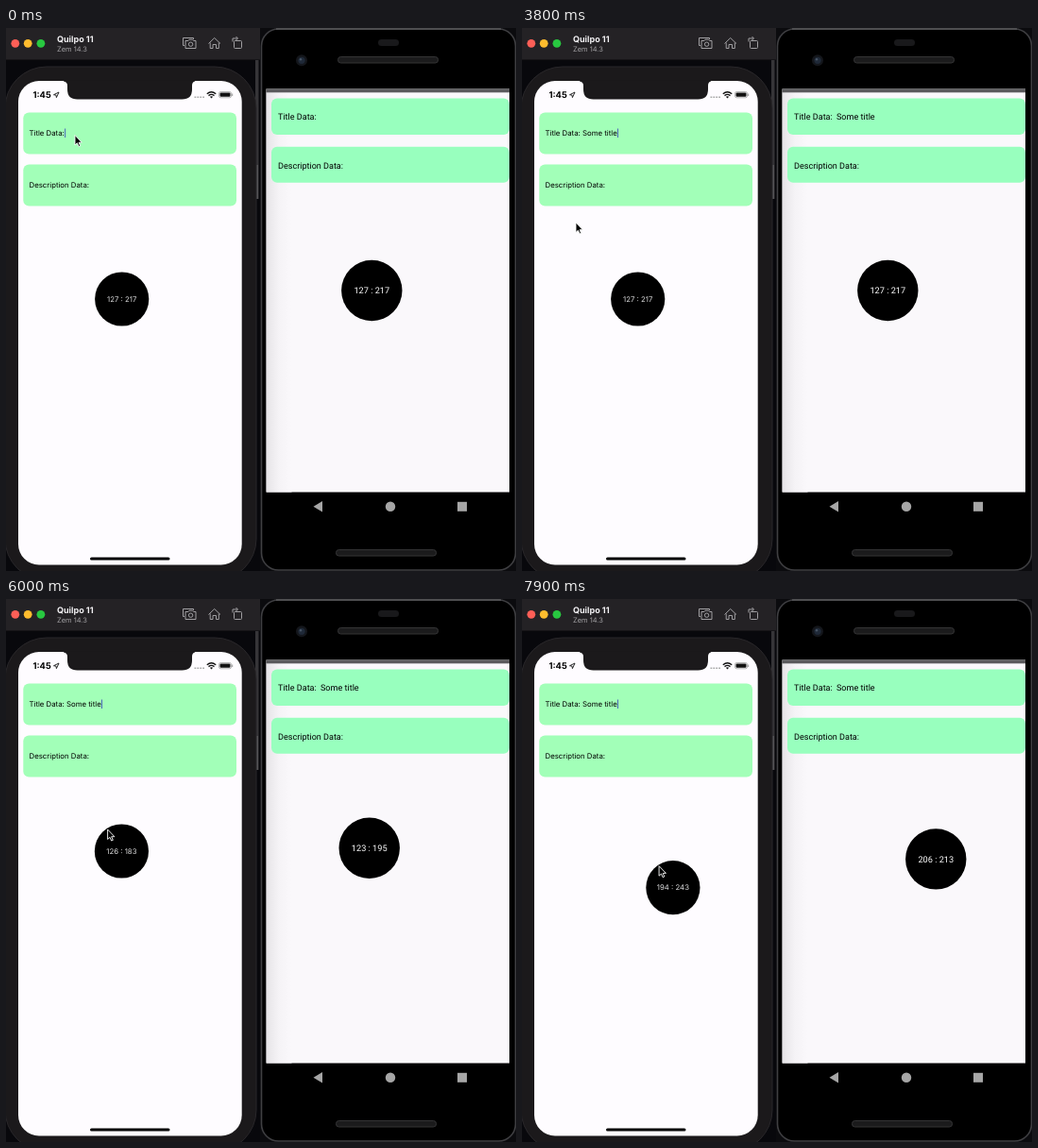
These frames come from a looping animation (540 px wide and 575 px high, 8000 ms). An HTML page:

```html
<!DOCTYPE html>
<html lang="en">
<head>
<meta charset="utf-8">
<title>Two phones in sync</title>
<style>
  html, body { margin: 0; width: 100%; height: 100%; overflow: hidden; background: #08080c; }
  svg { display: block; width: 540px; height: 575px; }
  text { white-space: pre; text-rendering: geometricPrecision; }
  .ios { font-family: Inter, "Liberation Sans", sans-serif; font-size: 7.8px; }
  .droid { font-family: Roboto, "Liberation Sans", sans-serif; font-size: 9.05px; }
  .mid { text-anchor: middle; }
  .tool { fill: none; stroke: #a09fa2; stroke-width: 1; stroke-linejoin: round; }
</style>
</head>
<body>
<svg viewBox="0 0 540 575">
  <defs>
    <linearGradient id="shade">
      <stop offset="0" stop-color="#e6e4e7"/>
      <stop offset=".5" stop-color="#f5f3f6"/>
      <stop offset="1" stop-color="#faf8fb"/>
    </linearGradient>
    <clipPath id="glass"><rect x="275.5" y="64.5" width="257.5" height="427"/></clipPath>
  </defs>

  <!-- left phone -->
  <rect y="33" width="271" height="542" fill="#08080c"/>
  <rect x="264" y="34" width="3.5" height="147" fill="#363538"/>
  <rect x="264.5" y="145" width="2.5" height="36" fill="#555457"/>
  <rect x="-1" y="41" width="266" height="544" rx="44" fill="#1b191b" stroke="#29272a"/>
  <rect x="13" y="56" width="236.7" height="512.5" rx="22" fill="#fefcff"/>
  <path d="M61 55.5H200V56.5Q197 57 197 61V65Q197 75.5 186.5 75.5H75.5Q65 75.5 65 65V61Q65 57 61 56.5Z" fill="#1b191b"/>
  <g class="ios">
    <text x="28.5" y="74" font-weight="700" style="font-size:9.3px">1:45</text>
    <path d="M50.5 70.7L56 68L53.4 73.6L53 71.1Z" fill="none" stroke="#111" stroke-width=".9"/>
    <path d="M199.500 73.200H210" stroke="#aaa" stroke-width="1.5" stroke-dasharray="1.8 1.1"/>
    <path d="M212.800 69.700Q217.500 65.800 222.200 69.700M214.500 71.600Q217.500 69.200 220.500 71.600" fill="none" stroke="#111" stroke-width="1.4"/>
    <path d="M215.900 72.800Q217.500 71.600 219.100 72.800L217.500 74.500Z" fill="#111"/>
    <rect x="225.5" y="67.5" width="13" height="6.3" rx="1.8" fill="none" stroke="#999" stroke-width=".7"/>
    <rect x="226.5" y="68.5" width="11" height="4.3" rx="1" fill="#111"/>
    <path d="M239.700 69.500V72" stroke="#999"/>
    <g fill="#a2ffb8">
      <rect x="18.3" y="89.5" width="225.700" height="44" rx="6"/>
      <rect x="18.3" y="144.5" width="225.700" height="44" rx="6"/>
    </g>
    <text id="leftTitle" x="24.5" y="114.3">Title Data:</text>
    <rect id="caret" y="106.5" width="1" height="9.5" fill="#4a68b8"/>
    <text x="24.5" y="169.3">Description Data:</text>
    <g id="leftBall">
      <circle r="28.6"/>
      <text id="leftLabel" class="mid" y="2.8" fill="#dededf"></text>
    </g>
  </g>
  <rect x="89" y="560.5" width="84.500" height="3" rx="1.5"/>

  <!-- window bar -->
  <rect width="269" height="33.5" fill="#242225"/>
  <circle cx="9.8" cy="16.3" r="4.4" fill="#fe5f57"/>
  <circle cx="23.2" cy="16.3" r="4.4" fill="#febc2e"/>
  <circle cx="36.9" cy="16.3" r="4.4" fill="#28c840"/>
  <text class="ios" x="54" y="15.3" fill="#f2f1f3" font-weight="700" style="font-size:9px">Quilpo 11</text>
  <text class="ios" x="54" y="24.6" fill="#a09fa2" style="font-size:7.5px">Zem 14.3</text>
  <g class="tool">
    <path d="M189 18.500H187.500V10.500H198.500V12"/>
    <path d="M190 13.500H193L194 12.200H197.500L198.500 13.500H201V21.500H190Z"/>
    <circle cx="195.6" cy="17.2" r="2.2"/>
    <path d="M214.500 16.500L220.700 10.500L227 16.500M216.200 15.500V21.500H219V17.500H222.500V21.500H225.300V15.500"/>
    <rect x="241.5" y="13.5" width="8" height="8" rx="1"/>
    <path d="M240 14.500V11H245M243.500 9L245.500 11L243.500 13"/>
  </g>

  <!-- right phone -->
  <rect x="269" width="271" height="575" fill="#0b0b0e"/>
  <rect x="270.5" y="1" width="269" height="573" rx="18" fill="#000" stroke="#3f3f42" stroke-width="1.6"/>
  <path d="M286 1H524" stroke="#58585b" stroke-width="1.6"/>
  <rect x="394" y="12" width="22" height="7" rx="3.5" fill="#19191b"/>
  <circle cx="313" cy="34.3" r="6" fill="#14161b"/>
  <circle cx="313" cy="34.3" r="3.6" fill="#1f2938"/>
  <circle cx="312" cy="33.3" r="1.2" fill="#465364"/>
  <g fill="#1b1b1c" stroke="#343435">
    <rect x="351.5" y="30.5" width="106" height="6.5" rx="3"/>
    <rect x="349.5" y="552.5" width="106" height="6.5" rx="3"/>
  </g>
  <g clip-path="url(#glass)">
    <rect x="275" y="64" width="258" height="428" fill="#faf8fb"/>
    <rect x="275.5" y="68" width="27" height="424" fill="url(#shade)"/>
    <rect x="275" y="64" width="258" height="4.3" fill="#5b5a5d"/>
    <g fill="#98ffbe">
      <rect x="281" y="74.5" width="252" height="38.5" rx="6"/>
      <rect x="281" y="125.7" width="252" height="38" rx="6"/>
    </g>
    <g class="droid">
      <text x="288" y="97.3">Title Data:</text>
      <text id="rightTitle" x="333" y="96.8"></text>
      <text x="288" y="148.7">Description Data:</text>
      <g id="rightBall">
        <circle r="32.2"/>
        <text id="rightLabel" class="mid" y="3.4" fill="#fff" style="font-size:9.2px"></text>
      </g>
    </g>
  </g>
  <g fill="#a6a6a6">
    <path d="M325.500 506.800L335 501V512.600Z"/>
    <circle cx="407" cy="506.8" r="5.2"/>
    <rect x="478" y="501.8" width="10" height="10"/>
  </g>

  <path id="pointer" d="M0 0V10.500L2.400 8.300L4 12L5.700 11.300L4.100 7.700H7.300Z" stroke="#fff" stroke-width=".9" stroke-linejoin="round"/>
</svg>

<script>
const LOOP = 8000, STEP = 100;
const $ = id => document.getElementById(id);
const TYPED = "Some title";

// [time, x, y] of the ball, in app units
const drag = [
  [5300, 127, 217], [5400, 127, 216], [5650, 123, 195], [5900, 126, 183],
  [6000, 126.5, 183.5], [6350, 152, 182], [6600, 206, 193], [6700, 206.7, 194.4],
  [7150, 214, 200], [7550, 206, 213], [7800, 194, 243], [7900, 189.3, 248.3]
];

// [time, x, y] of the pointer until it holds the ball
const hover = [
  [0, 73, 113.5], [1600, 73, 113.5], [2200, 70.5, 109.5], [2900, 70.5, 109.5],
  [3600, 57, 206], [4300, 57, 206], [5000, 104, 263.5], [5400, 104, 263.5], [5650, 105.3, 251]
];

const slope = (a, b, k) => (b[k] - a[k]) / (b[0] - a[0]);

// tangent that never overshoots a turning point
function tangent(path, i, k) {
  if (i === 0 || i === path.length - 1) return 0;
  const [a, b, c] = path.slice(i - 1, i + 2);
  const s = slope(a, b, k), u = slope(b, c, k);
  return s * u <= 0 ? 0 : 2 * s * u / (s + u);
}

function along(path, t) {
  const last = path.length - 1;
  if (t <= path[0][0]) return path[0].slice(1);
  if (t >= path[last][0]) return path[last].slice(1);
  const i = path.findIndex(p => p[0] > t) - 1;
  const a = path[i], b = path[i + 1], h = b[0] - a[0], u = (t - a[0]) / h;
  return [1, 2].map(k => {
    const rise = u * u * (3 - 2 * u);
    return a[k] + (b[k] - a[k]) * rise
      + h * u * (1 - u) * (tangent(path, i, k) * (1 - u) - tangent(path, i + 1, k) * u);
  });
}

// left phone types a leading space first, then one key every 200 ms with a pause between words
function keys(t) {
  const first = Math.floor((t - 900) / 200) + 1;
  const second = Math.floor((t - 2300) / 200) + 1;
  return Math.max(0, Math.min(5, first)) + Math.max(0, Math.min(6, second));
}

function caretAlpha(t) {
  const p = t % 1000;
  if (p >= 300 && p < 700) return 0;
  return (p >= 200 && p < 300) || (p >= 700 && p < 800) ? .4 : 1;
}

const place = (el, x, y) => el.setAttribute("transform", `translate(${x} ${y})`);
const label = ([x, y]) => `${Math.round(x)} : ${Math.round(y)}`;
const toStage = ([x, y], cx, cy, scale) => [cx + (x - 127) * scale, cy + (y - 217) * scale];

function draw(t) {
  const left = toStage(along(drag, t), 122.7, 287, .597);
  place($("leftBall"), ...left);
  $("leftLabel").textContent = label(along(drag, t - 100));
  $("leftBall").setAttribute("opacity", t < 5200 || t >= 5600 ? 1 : t < 5300 || t >= 5500 ? .5 : .24);

  const echo = along(drag, t - 350);
  place($("rightBall"), ...toStage(echo, 387.3, 278, .645));
  $("rightLabel").textContent = label(echo);

  const title = $("leftTitle");
  title.textContent = "Title Data:" + (" " + TYPED).slice(0, keys(t));
  $("caret").setAttribute("x", 24.5 + title.getComputedTextLength() + .3);
  $("caret").setAttribute("opacity", caretAlpha(t));
  $("rightTitle").textContent = TYPED.slice(0, Math.max(0, keys(t - 300) - 1));

  const tip = t < 5650 ? along(hover, t) : [left[0] - 14.8, left[1] - 23];
  place($("pointer"), ...tip);
}

const start = performance.now();
function tick() {
  const t = (performance.now() - start) % LOOP;
  draw(Math.floor(t / STEP) * STEP);
  requestAnimationFrame(tick);
}
draw(0);
requestAnimationFrame(tick);
</script>
</body>
</html>
```
